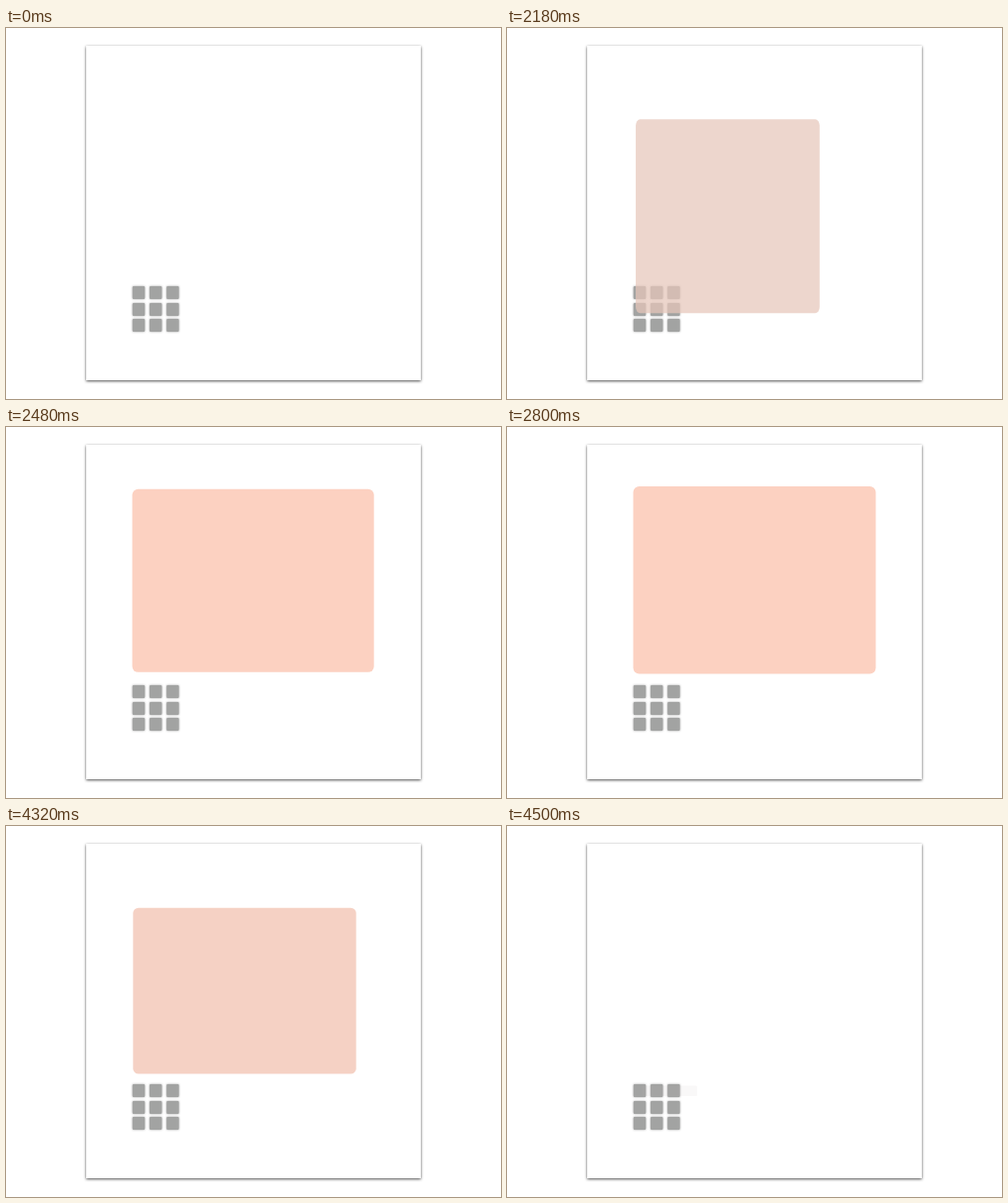
These frames come from a looping animation (500x375 px, 5.78 s). An HTML page:

```html
<!DOCTYPE html>
<html lang="en">
<head>
<meta charset="utf-8">
<title>Panel</title>
<style>
  html, body { margin: 0; width: 100%; height: 100%; overflow: hidden; background: #fff; }
  svg { display: block; width: 100%; height: 100%; }
  .card { fill: #fff; filter: drop-shadow(0 1.9px 1.8px rgba(0, 0, 0, .7)); }
  .tiles { fill: #a2a3a2; filter: drop-shadow(0 .8px .8px rgba(0, 0, 0, .36)); }
</style>
</head>
<body>
<svg viewBox="0 0 500 375">
  <rect class="card" x="81" y="18" width="338" height="338"/>
  <g class="tiles" id="tiles"></g>
  <rect id="panel"/>
</svg>
<script>
const LOOP = 5780, OPEN = 2080, CLOSE = 4320, END = 4500, TICK = 20;
const GREY = [162, 162, 162], SALMON = [252, 209, 193];
const FULL = { cx: 250, cy: 154.75, w: 245, h: 189.5 };
const HOME = { cx: 138, cy: 301.7 };

const tiles = document.getElementById('tiles');
const panel = document.getElementById('panel');

function set(el, attrs) {
  for (const k in attrs) el.setAttribute(k, attrs[k]);
}

for (let i = 0; i < 9; i++) {
  const tile = document.createElementNS('http://www.w3.org/2000/svg', 'rect');
  set(tile, {
    x: 127.8 + (i % 3) * 17.2, y: Math.round(261 + Math.floor(i / 3) * 16.5),
    width: 12.4, height: 13, rx: 1
  });
  tiles.append(tile);
}

const lerp = (a, b, p) => a + (b - a) * p;
const clamp = v => Math.max(0, Math.min(1, v));

// Critically damped spring, x = rate * time
const ease = x => 1 - (1 + x) * Math.exp(-x);

// Underdamped spring, t in seconds
function bounce(t) {
  const a = 8.3, b = 13.8;
  return 1 - Math.exp(-a * t) * (Math.cos(b * t) + a / b * Math.sin(b * t));
}

// p drives position, width and colour; s drives height
function pose(t) {
  if (t < OPEN) return null;
  if (t < CLOSE) {
    const u = Math.max(t, OPEN + 2 * TICK) === t ? t : OPEN;
    return { p: ease((u - 2018) * 0.0169), s: bounce((u - 2019) / 1000) };
  }
  const u = Math.min(t, END);
  return { p: 1 - ease((u - 4284) * 0.01296), s: 1 - bounce((u - 4266) * 0.000607) };
}

function draw(time) {
  const t = Math.floor((time % LOOP) / TICK) * TICK;
  const now = pose(t);
  panel.style.display = now ? '' : 'none';
  if (!now) return;
  const { p, s } = now;
  const w = FULL.w * p, h = FULL.h * Math.max(0, s);
  const rgb = GREY.map((c, i) => Math.round(lerp(c, SALMON[i], p)));
  set(panel, {
    x: lerp(HOME.cx, FULL.cx, p) - w / 2,
    y: lerp(HOME.cy, FULL.cy, p) - h / 2,
    width: w, height: h,
    rx: 6 * p, ry: 6 * Math.max(0, s),
    fill: `rgb(${rgb})`,
    'fill-opacity': clamp((p - 0.16) * 1.2)
  });
}

const start = performance.now();
function frame() {
  draw(performance.now() - start);
  requestAnimationFrame(frame);
}
frame();
</script>
</body>
</html>
```
